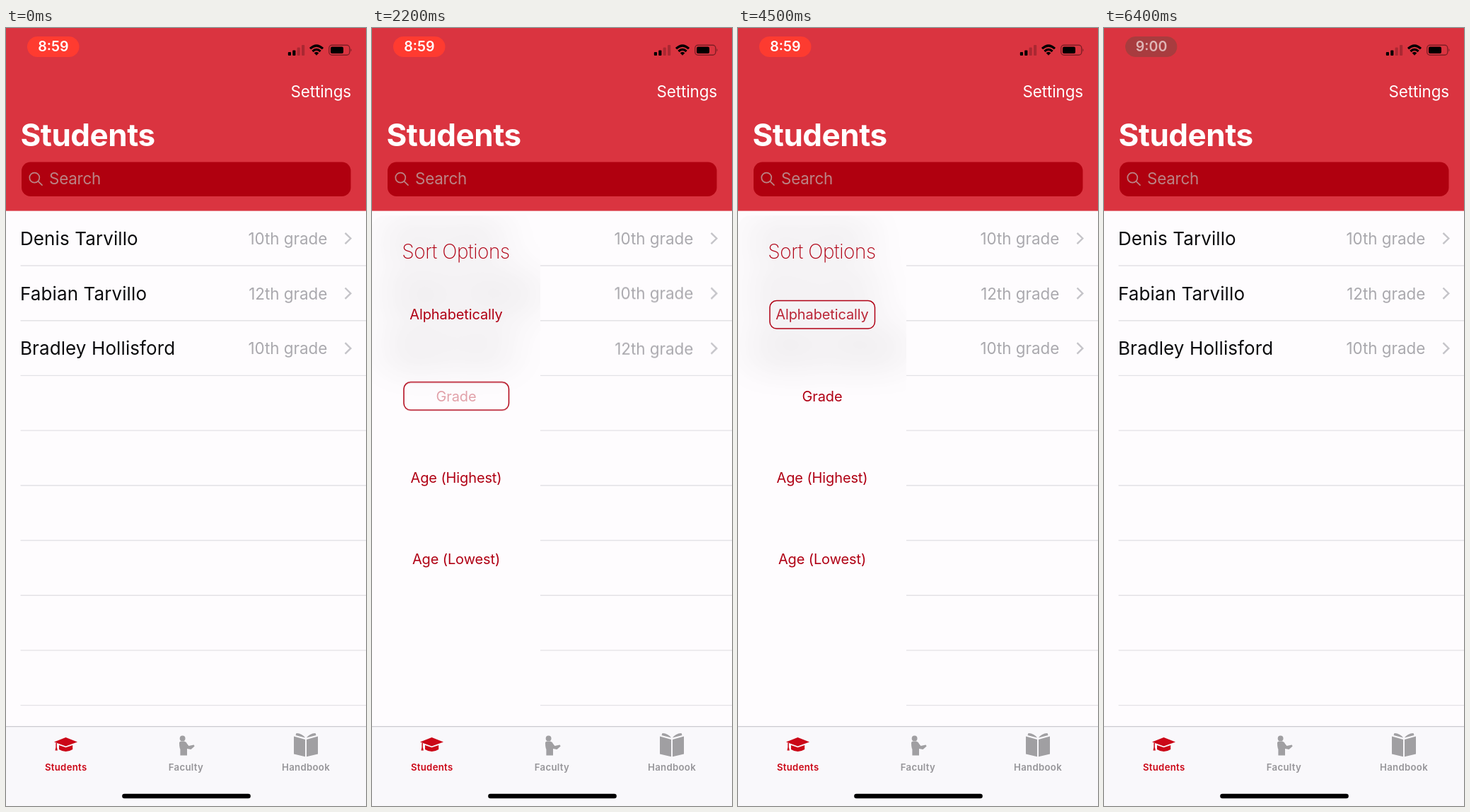
Animation, 509 px wide and 1100 px high, one loop 6.5 s. Source, as an HTML page:

```html
<!DOCTYPE html>
<html lang="en">
<head>
<meta charset="utf-8">
<title>Student list with sort panel</title>
<style>
  :root { --loop: 6500ms; --red: #b00014; --paper: #fefcfe; }
  html, body { margin: 0; width: 100%; height: 100%; overflow: hidden; background: var(--paper); }
  #stage { position: relative; width: 509px; height: 1100px; overflow: hidden; background: var(--paper); }
  svg { position: absolute; left: 0; top: 0; display: block; }
  text { font-family: Inter, Roboto, "Liberation Sans", sans-serif; }

  .mid { text-anchor: middle; }
  .end { text-anchor: end; }
  .title { font-size: 44px; font-weight: 700; letter-spacing: -.5px; fill: #fff; }
  .bar { font-size: 22.4px; letter-spacing: -.1px; fill: #fff; }
  .hint { font-size: 22.4px; letter-spacing: -.2px; fill: #bb8386; }
  .clock { font-size: 19.6px; font-weight: 600; fill: #fff; }
  .name { font-size: 26px; letter-spacing: .1px; fill: #0b0b0d; }
  .grade { font-size: 22.4px; fill: #aaa9ae; }
  .tab { font-size: 13.2px; font-weight: 600; letter-spacing: .3px; }
  .head { font-size: 28px; font-weight: 200; letter-spacing: -.45px; fill: var(--red); }
  .option { font-size: 20px; letter-spacing: -.12px; fill: var(--red); }

  #panel {
    position: absolute; left: 0; top: 265px; width: 238px; height: 740px;
    overflow: hidden; border-radius: 18px 18px 0 0; background: var(--paper);
    animation: slide var(--loop) ease-in-out infinite;
  }
  /* Blurred copy of the list, held still while the panel slides over it */
  #hold {
    position: absolute; left: 0; top: 0; width: 509px; height: 740px;
    animation: hold var(--loop) ease-in-out infinite;
  }
  #frost { filter: blur(30px); opacity: .6; overflow: visible; }

  .sorted { animation: sort var(--loop) step-end infinite; }
  .pressed { animation: press var(--loop) linear infinite; }
  .pulse { animation: pulse var(--loop) ease-in-out infinite; }
  .early { animation: early var(--loop) step-end infinite; }
  .late { animation: late var(--loop) step-end infinite; }

  @keyframes slide {
    0%, 4.62% { transform: translateX(-238px); }
    9.23%, 76.12% { transform: translateX(0); }
    80.74%, 100% { transform: translateX(-238px); }
  }
  @keyframes hold {
    0%, 4.62% { transform: translateX(238px); }
    9.23%, 76.12% { transform: translateX(0); }
    80.74%, 100% { transform: translateX(238px); }
  }
  /* --a, --b, --c: slot for each sort order; --h: slot height */
  @keyframes sort {
    0% { transform: translateY(calc(var(--a) * var(--h))); }
    32.62% { transform: translateY(calc(var(--b) * var(--h))); }
    49.54% { transform: translateY(calc(var(--c) * var(--h))); }
    64.15%, 100% { transform: translateY(calc(var(--a) * var(--h))); }
  }
  @keyframes press {
    0%, 1.38% { opacity: .2; }
    7.69%, 100% { opacity: 1; }
  }
  @keyframes pulse {
    0%, 1.5%, 32.3%, 35%, 66%, 67.7%, 100% { fill: #ff3b30; }
    10.8%, 20%, 44.6%, 55.4%, 77.7%, 87.7% { fill: #dc322d; }
  }
  @keyframes early { 0% { opacity: 1; } 97.69%, 100% { opacity: 0; } }
  @keyframes late { 0% { opacity: 0; } 97.69%, 100% { opacity: 1; } }
</style>
</head>
<body>
<div id="stage">
  <svg width="509" height="1100" viewBox="0 0 509 1100">
    <g id="lines" stroke="#e3e2e6" stroke-width="1.4"></g>
    <g id="rows"></g>

    <rect width="509" height="258.6" fill="#da3440"/>
    <rect class="pulse" x="30" y="12" width="73.5" height="29" rx="14.5" fill="#ff3b30"/>
    <text class="clock mid early" x="67" y="33.3">8:59</text>
    <g class="late">
      <rect x="30" y="12" width="73.5" height="29" rx="14.5" fill="#a83c3f"/>
      <text class="clock mid" x="67" y="33.3" style="fill:#dfb6b6">9:00</text>
    </g>

    <g id="signal"></g>
    <g fill="none" stroke="#000" stroke-width="3.2">
      <path d="M430 29.2 Q439 20.8 448 29.2"/>
      <path d="M433.4 33 Q439 27.8 444.6 33"/>
    </g>
    <path d="M435.6 35.2 Q439 32.2 442.4 35.2 L439 38.8Z"/>
    <rect x="456.8" y="24.2" width="29" height="14" rx="4" fill="none" stroke="#000" stroke-opacity=".42" stroke-width="1.4"/>
    <rect x="459" y="26.4" width="18" height="9.6" rx="2"/>
    <path d="M487.4 29 q2.2 2.2 0 4.5Z" fill-opacity=".45"/>

    <text class="bar end" x="488" y="97.6">Settings</text>
    <text class="title" x="20.5" y="166.8">Students</text>
    <rect x="22" y="189.5" width="465.5" height="48.5" rx="12.5" fill="#b0000f"/>
    <g fill="none" stroke="#bb8386" stroke-width="1.7" stroke-linecap="round">
      <circle cx="40.3" cy="211.6" r="7"/>
      <path d="M45.5 216.8 L51 222.2"/>
    </g>
    <text class="hint" x="61" y="221.1">Search</text>
  </svg>

  <div id="panel">
    <div id="hold">
      <svg id="frost" width="509" height="740" viewBox="0 265 509 740"></svg>
    </div>
    <svg id="menu" width="238" height="740" viewBox="0 265 238 740">
      <text class="head mid" x="118.5" y="326">Sort Options</text>
      <rect class="sorted" style="--a:0;--b:1;--c:3;--h:115.2px"
        x="45" y="385.6" width="148.5" height="39.4" rx="9.5" fill="none" stroke="#b00014" stroke-width="1.5"/>
    </svg>
  </div>

  <svg width="509" height="1100" viewBox="0 0 509 1100">
    <rect y="987.5" width="509" height="113" fill="#f9f8fb"/>
    <path d="M0 987.7 H509" stroke="#cccbd0" stroke-width="1.3"/>
    <g fill="#cb0717">
      <path d="M68 1009.6 L84.5 1003 L101 1009.6 L84.5 1015.4Z"/>
      <path d="M75 1014 L84.5 1017.3 L94.2 1014 V1020 Q84.5 1026 75 1020Z"/>
      <path d="M70.4 1011 h1.5 v6 l1 4.5 h-3.4 l.9 -4.5Z"/>
      <text class="tab mid" x="84.7" y="1049.5">Students</text>
    </g>
    <g fill="#a09fa2">
      <circle cx="249.6" cy="1004.4" r="3.9"/>
      <path d="M245 1011 Q245 1008.4 248 1008.4 H252 Q255 1009 256 1012 L258.4 1015 L265.6 1013.4 L266.6 1015.6 L261.5 1020 L256 1019 V1028.5 H246.4 V1020 Q245 1017 245 1011Z"/>
      <path d="M407 1001.5 L423 1006 V1030.3 L407 1026.5Z M425 1006 L441 1001.5 V1026.5 L425 1030.3Z"/>
      <path d="M410.5 997 Q419 997.5 423.2 1003.6 L409.5 1000Z M437.5 997 Q429 997.5 424.8 1003.6 L438.5 1000Z"/>
    </g>
    <g fill="#969599">
      <text class="tab mid" x="254.4" y="1049.5">Faculty</text>
      <text class="tab mid" x="424" y="1049.5">Handbook</text>
    </g>
    <rect x="164.2" y="1082.8" width="181.6" height="6.4" rx="3.2"/>
  </svg>
</div>

<script>
  const ROW = 77.7;
  const el = id => document.getElementById(id);

  function add(parent, tag, attrs, text) {
    const node = document.createElementNS("http://www.w3.org/2000/svg", tag);
    for (const key in attrs) node.setAttribute(key, attrs[key]);
    if (text) node.textContent = text;
    parent.appendChild(node);
    return node;
  }

  for (let i = 0; i < 9; i++) {
    add(el("lines"), "path", { d: `M20.5 ${336 + i * ROW} H509` });
  }

  // Slots: alphabetical, by grade, youngest first
  const students = [
    ["Denis Tarvillo", "10th grade", [0, 0, 1]],
    ["Fabian Tarvillo", "12th grade", [1, 2, 2]],
    ["Bradley Hollisford", "10th grade", [2, 1, 0]]
  ];
  for (const [name, grade, [a, b, c]] of students) {
    const row = add(el("rows"), "g", {
      class: "sorted", style: `--a:${a};--b:${b};--c:${c};--h:${ROW}px`
    });
    add(row, "text", { class: "name", x: 20, y: 307 }, name);
    add(row, "text", { class: "grade end", x: 454.3, y: 306 }, grade);
    add(row, "path", {
      d: "M479.5 289.8 L487.3 297.5 L479.5 305.2",
      fill: "none", stroke: "#c5c4c9", "stroke-width": 2.4
    });
    el("frost").appendChild(row.cloneNode(true));
  }

  [5, 7.5, 11.5, 15].forEach((h, i) => add(el("signal"), "rect", {
    x: 398.8 + i * 6.4, y: 39 - h, width: 4.2, height: h, rx: 1,
    "fill-opacity": i < 2 ? 1 : 0.22
  }));

  // Label and the moment its button is touched
  const options = [
    ["Alphabetically", 4080], ["Grade", 2030], ["Age (Highest)"], ["Age (Lowest)", 3130]
  ];
  options.forEach(([label, touch], i) => add(el("menu"), "text", {
    class: "option mid" + (touch ? " pressed" : ""),
    style: touch ? `animation-delay:${touch}ms` : "",
    x: 119, y: 412.3 + i * 115.2
  }, label));
</script>
</body>
</html>
```
